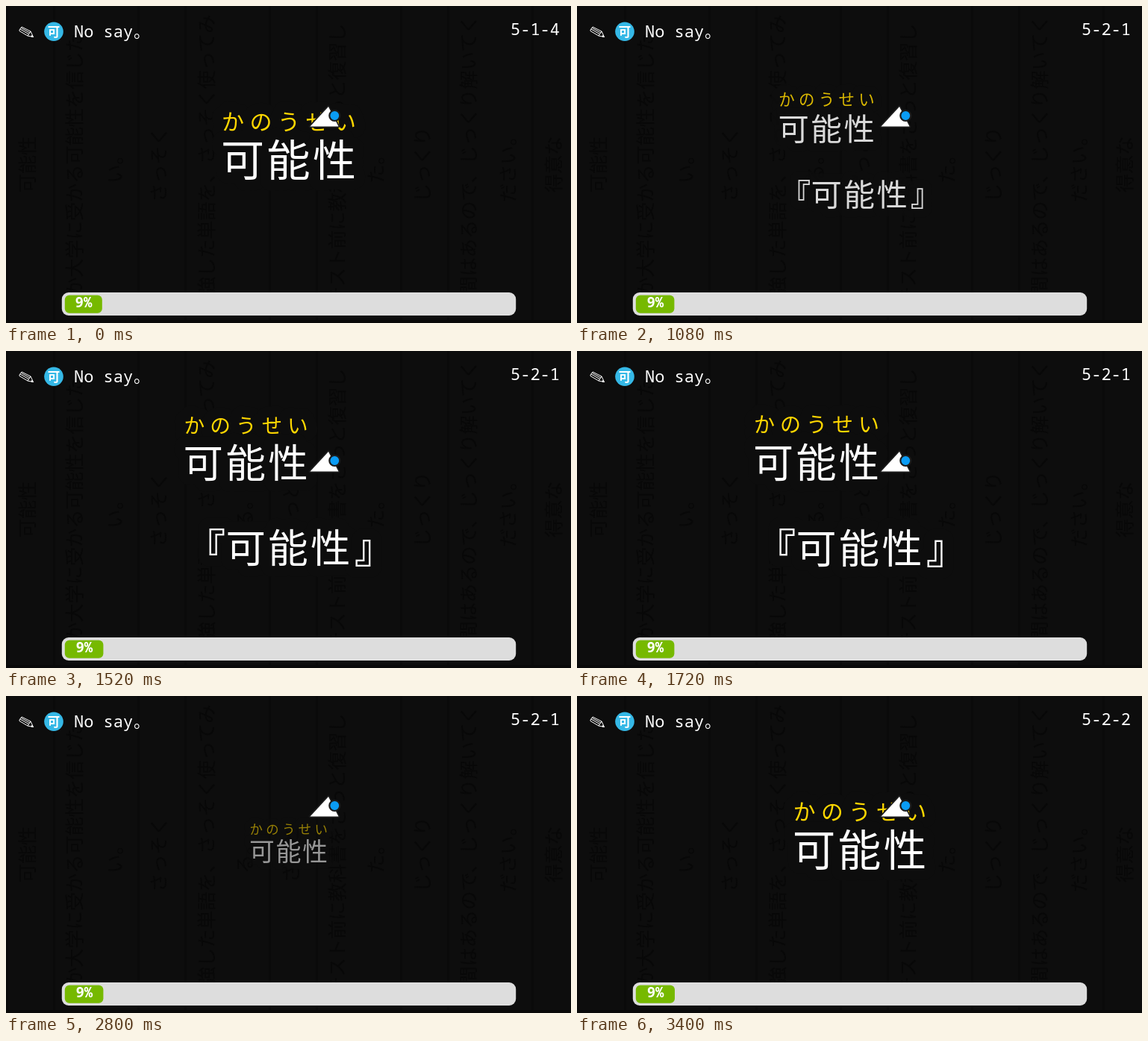
An HTML page for the animation above (3.48 s loop, 757 px wide and 425 px high).

```html
<!DOCTYPE html>
<html lang="ja">
<head>
<meta charset="utf-8">
<title>Vocabulary slides</title>
<style>
  html, body { margin: 0; width: 100%; height: 100%; overflow: hidden; background: #0d0d0d; }
  svg { display: block; width: 757px; height: 425px; }
  text { font-family: "Noto Sans CJK JP", "Noto Sans CJK", sans-serif; white-space: pre; }
  .mono { font-family: "Noto Sans Mono", "DejaVu Sans Mono", monospace; font-size: 22px; font-weight: 500; fill: #fff; }
  .back text { font-size: 25.2px; fill: #080808; text-anchor: middle; }
  .kanji { fill: #fff; font-weight: 500; letter-spacing: 3.5px; }
  .bracket { fill: #fff; font-weight: 700; }
  .kana { fill: #ffd700; font-weight: 500; letter-spacing: .25em; }
  .halo text { fill: #0d0d0d; stroke: #0d0d0d; stroke-width: 30; stroke-linejoin: round; }
</style>
</head>
<body>
<svg viewBox="0 0 757 425">
  <rect width="757" height="425" fill="#0d0d0d"/>
  <g class="back" id="back"></g>
  <rect y="421" width="757" height="4" fill="#090909"/>

  <g fill="none" stroke="#fff" stroke-width="1" stroke-linejoin="round">
    <path d="M18 32 L21 28 L33 34 L36.5 41.5 L29 40 L18 33.5 Z"/>
    <path d="M19 31 L30 37.5 M20.5 29.5 L32 36 M33 34 L29 40"/>
    <path d="M34.5 39.5 L36.5 41.5 L33.8 41 Z" fill="#fff"/>
  </g>
  <circle cx="64" cy="34.3" r="12.8" fill="#35b8e6"/>
  <text x="64" y="40.6" font-size="16.5" font-weight="900" fill="#fff" text-anchor="middle">可</text>
  <text class="mono" x="91" y="41.5">No say</text>
  <text x="171" y="41.5" font-size="22" font-weight="500" fill="#fff">。</text>
  <text class="mono" id="label" x="742" y="38.7" text-anchor="end"></text>

  <rect x="74.8" y="384" width="608.4" height="31" rx="9" fill="#ddd"/>
  <rect id="bar" x="78.8" y="387.7" height="24" rx="6" fill="#76b900"/>
  <text class="mono" id="percent" y="404" text-anchor="middle" style="font-size:19px;font-weight:800">9%</text>

  <g id="word"></g>
  <g id="quote"></g>

  <path d="M432 135 L407.5 161.5 H445.5 Z" fill="#fff" stroke="#1c1c1c" stroke-width="3.4"
        paint-order="stroke" stroke-linejoin="round"/>
  <circle cx="440.3" cy="147" r="7" fill="#0a9cf5" stroke="#1c1c1c" stroke-width="2.2"/>
  <circle id="click" cx="406" cy="161" r="21" fill="#ff0" fill-opacity=".5"/>
</svg>
<script>
const LOOP = 3480, STEP = 40, ZOOM = 1030;
const CX = 378.5, CY = 212.5;
const $ = id => document.getElementById(id);

function add(parent, tag, attrs, text = "") {
  const el = document.createElementNS("http://www.w3.org/2000/svg", tag);
  for (const key in attrs) el.setAttribute(key, attrs[key]);
  el.textContent = text;
  return parent.appendChild(el);
}

// Dimmed sentence cards: text turned a quarter left, [column centre, text]
const sentences = [
  [28, "可能性"], [91, "か大学に受かる可能性を信じた"], [145, "い。"],
  [204, "さっそく"], [268, "勉強した単語を、さっそく使ってみ"], [319, "る。"],
  [381, "ざっと"], [443, "テスト前に教科書をざっと復習し"], [495, "た。"],
  [557, "じっくり"], [619, "時間はあるので、じっくり解いてく"], [672, "ださい。"],
  [733, "得意な"]
];
for (let x = 0; x < 757; x += 176) {
  for (const edge of [x, x + 63])
    add($("back"), "rect", { x: edge, y: 0, width: 3, height: 425, fill: "#0a0a0a" });
}
for (const [x, text] of sentences)
  add($("back"), "text", { transform: `translate(${x + 9.5} ${CY}) rotate(-90)` }, text);

// Each line: [class, x, baseline, size, text]
function buildCard(card, lines) {
  for (const layer of ["halo", "ink"]) {
    const group = add(card, "g", { class: layer });
    for (const [name, x, y, size, text] of lines)
      add(group, "text", { class: name, x, y, "font-size": size }, text);
  }
}
buildCard($("word"), [
  ["kana", 289, 165.5, 30, "かのうせい"],
  ["kanji", 288, 228, 58, "可能性"]
]);
buildCard($("quote"), [
  ["kana", 237, 109, 28, "かのうせい"],
  ["kanji", 236, 170, 54, "可能性"],
  ["bracket", 239, 285, 54, "『"],
  ["kanji", 293.5, 285, 54, "可能性"],
  ["bracket", 468, 285, 54, "』"]
]);

const clamp = v => Math.min(1, Math.max(0, v));
const ramp = (t, from, to) => clamp((t - from) / (to - from));

// cubic-bezier(.25, .1, .25, 1)
function ease(x) {
  const curve = (a, b, u) => 3 * (1 - u) ** 2 * u * a + 3 * (1 - u) * u * u * b + u ** 3;
  let lo = 0, hi = 1;
  for (let i = 0; i < 24; i++) {
    const mid = (lo + hi) / 2;
    if (curve(.25, .25, mid) < x) lo = mid; else hi = mid;
  }
  return curve(.1, 1, lo);
}

function showCard(card, visible, progress) {
  const scale = .2 + .8 * progress;
  card.setAttribute("display", visible ? "inline" : "none");
  card.setAttribute("opacity", clamp(progress * 1.2));
  card.setAttribute("transform",
    `translate(${CX} ${CY}) scale(${scale}) translate(${-CX} ${-CY})`);
}

function draw(t) {
  const quoteShown = t >= 640 && t < 2600;
  showCard($("word"), !quoteShown, t < 640 ? 1 : ease(ramp(t, 2510, 2510 + ZOOM)));
  showCard($("quote"), quoteShown, ease(ramp(t, 650, 650 + ZOOM)));

  const clicked = (t >= 520 && t < 640) || (t >= 2480 && t < 2600);
  $("click").setAttribute("display", clicked ? "inline" : "none");
  $("label").textContent = t < 640 ? "5-1-4" : t < 3240 ? "5-2-1" : "5-2-2";

  const width = 50 + ramp(t, 40, 280) + .6 * ramp(t, 640, 1000) + .6 * ramp(t, 3040, 3400);
  $("bar").setAttribute("width", width);
  $("percent").setAttribute("x", 79 + width / 2);
}

const start = performance.now();
function tick() {
  const t = (performance.now() - start) % LOOP;
  draw(Math.floor(t / STEP) * STEP);
  requestAnimationFrame(tick);
}
tick();
</script>
</body>
</html>
```
